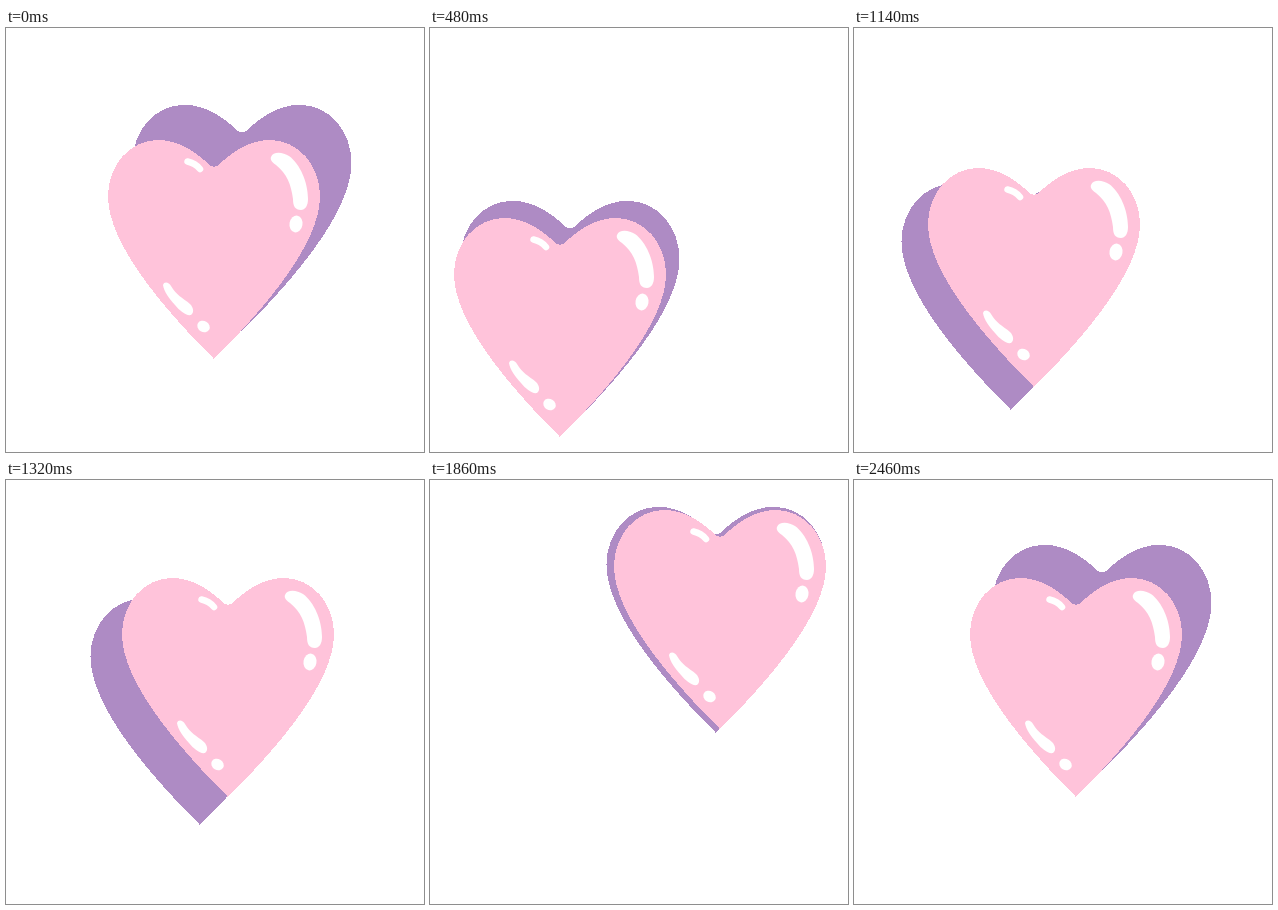
An HTML page that plays this animation: 418 px wide and 424 px high, repeating every 2.52 s.

```html
<!DOCTYPE html>
<html lang="en">
<head>
<meta charset="utf-8">
<title>Swinging heart</title>
<style>
  html, body { margin: 0; width: 100%; height: 100%; overflow: hidden; background: #fff; }
  svg { display: block; width: 418px; height: 424px; }
</style>
</head>
<body>
<svg viewBox="0 0 418 424">
  <defs>
    <!-- The tip of the heart is the local origin -->
    <path id="heart" shape-rendering="crispEdges" d="M0 0
      C-50 -50 -106 -115 -106 -163
      C-106 -194 -84 -219 -56 -219
      C-34 -219 -16 -205 -5 -194.5
      Q0 -190 5 -194.5
      C16 -205 34 -219 56 -219
      C84 -219 106 -194 106 -163
      C106 -115 50 -50 0 0Z"/>
  </defs>
  <g id="back"><use href="#heart" transform="scale(1.033)" fill="#ae8bc4"/></g>
  <g id="front">
    <use href="#heart" fill="#ffc3da"/>
    <g transform="translate(-208 -331)" fill="#fff">
      <path d="M265 129C267 123 277 124 283 128C294 136 302 154 302 171C302 178 299 182 295 182
        C289 182 287 178 287 171C285 156 281 146 270 137C266 134 264 132 265 129Z"/>
      <ellipse cx="290" cy="196" rx="6.5" ry="8.5" transform="rotate(10 290 196)"/>
      <path d="M181.5 133.5Q189 135 194 141" fill="none" stroke="#fff" stroke-width="6.5" stroke-linecap="round"/>
      <path d="M157 257C158 253 163 254 165 258C170 267 177 270 184 276C188 280 188 285 185 287
        C180 288 174 283 169 277C163 270 158 264 157 257Z"/>
      <ellipse cx="197.5" cy="298.5" rx="6.5" ry="5.5" transform="rotate(30 197.5 298.5)"/>
    </g>
  </g>
</svg>
<script>
  const STEP = 60, COUNT = 42, HALF = COUNT / 2, REACH = 82, LAG = 2;
  const front = document.getElementById('front');
  const back = document.getElementById('back');

  // Equivalent to cubic-bezier(.45, 0, .55, 1)
  function ease(x) {
    let lo = 0, hi = 1;
    for (let i = 0; i < 24; i++) {
      const s = (lo + hi) / 2, r = 1 - s;
      const bx = 1.35 * r * r * s + 1.65 * r * s * s + s * s * s;
      if (bx < x) lo = s; else hi = s;
    }
    return lo * lo * (3 - 2 * lo);
  }

  // Diagonal offset: one eased swing each way per loop
  function swing(n) {
    const k = (n + HALF / 2 + COUNT) % COUNT;
    const y = ease((k % HALF) / HALF);
    return Math.round(REACH * (k < HALF ? 1 - 2 * y : 2 * y - 1));
  }

  function place(el, n) {
    const d = swing(n);
    el.setAttribute('transform', `translate(${208 + d} ${331 - d})`);
  }

  const start = performance.now();
  function draw(now) {
    const n = Math.floor(Math.max(0, now - start) / STEP) % COUNT;
    place(front, n);
    place(back, n - LAG);
    requestAnimationFrame(draw);
  }
  draw(start);
</script>
</body>
</html>
```
